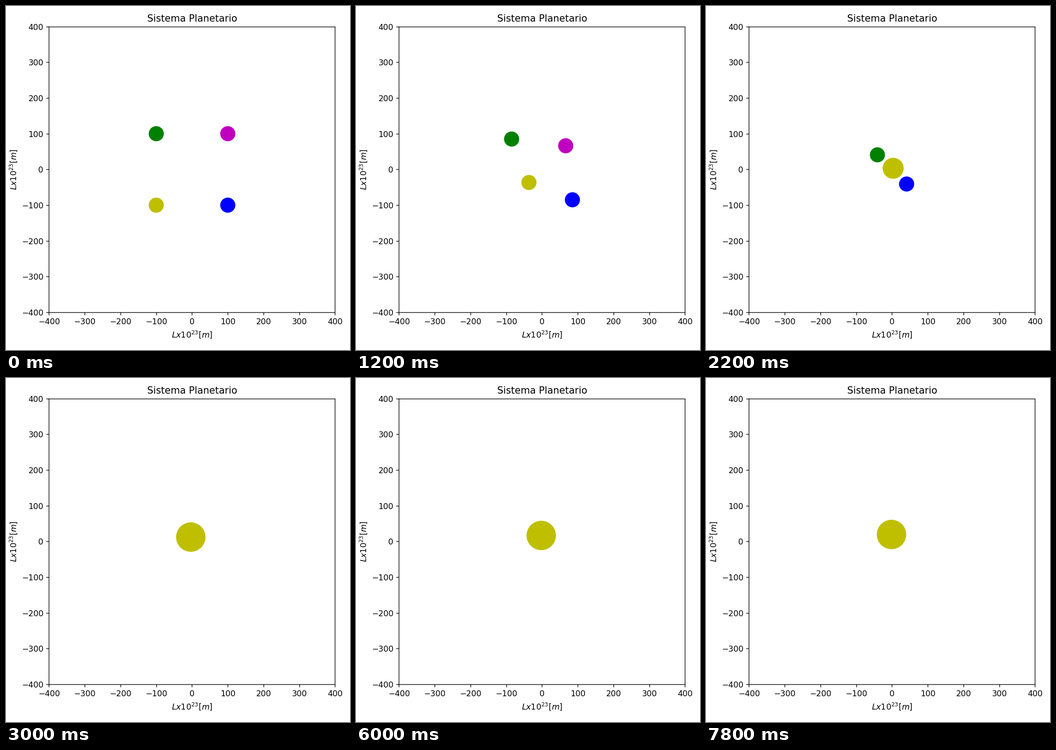
These frames come from a looping animation (748x748 px, 8000 ms). A matplotlib script:

```python
import matplotlib.pyplot as plt
from matplotlib.animation import FuncAnimation

SIZE, DPI = 748, 125
FRAMES, INTERVAL = 40, 200
RADIUS = 20
LEFT, BOTTOM, WIDTH, HEIGHT = 93.48, 81.9, 622, 621.55
HIT_MAGENTA, HIT_BLUE, HIT_GREEN = 9, 12, 13

plt.rcParams["font.family"] = "DejaVu Sans"
fig = plt.figure(figsize=(SIZE / DPI, SIZE / DPI), dpi=DPI, facecolor="white")
ax = fig.add_axes([v / SIZE for v in (LEFT, BOTTOM, WIDTH, HEIGHT)])
ax.set(xlim=(-400, 400), ylim=(-400, 400), title="Sistema Planetario",
       xlabel="$Lx10^{23}[m]$", ylabel="$Lx10^{23}[m]$")


def planet(color, z):
    return ax.add_patch(plt.Circle((0, 0), RADIUS, color=color, lw=1, zorder=z))


green, magenta, blue = planet("g", 1.1), planet("m", 1.2), planet("b", 1.3)
yellow = planet("y", 1.5)
planets = [green, magenta, blue, yellow]


def fall(t, v, a, b):
    """Distance covered by a body whose pull grows on the way in."""
    return v * t + a * t**2 + b * t**4


def yellow_state(t):
    """Centre of the yellow body and how many bodies it has absorbed."""
    if t < HIT_MAGENTA:
        d = fall(t, 5.2, 0.822, 0.002) - 100
        return (d, d), 1
    if t < HIT_GREEN:
        d = 2.6 + 0.2 * (t - 8)
        hit = t >= HIT_BLUE
        push = 3 if hit else 0
        return (d - push, d + push), 3 if hit else 2
    return (-3.4 + 0.083 * (t - 15), 12.1 + 0.303 * (t - 15)), 4


def draw(t):
    side = 100 - fall(t, 0, 0.3865, 0.000846)
    diag = 100 - fall(t, 0, 0.869, 0.00195)
    green.center = (-side, side)
    blue.center = (side, -side)
    magenta.center = (diag, diag)
    for body, end in ((magenta, HIT_MAGENTA), (blue, HIT_BLUE), (green, HIT_GREEN)):
        body.set_visible(t < end)
    yellow.center, count = yellow_state(t)
    yellow.set_radius(RADIUS * count**0.5)
    return planets


def init():
    return draw(0)


anim = FuncAnimation(fig, draw, frames=FRAMES, init_func=init,
                     interval=INTERVAL, repeat=True, repeat_delay=0)
plt.show()
```
